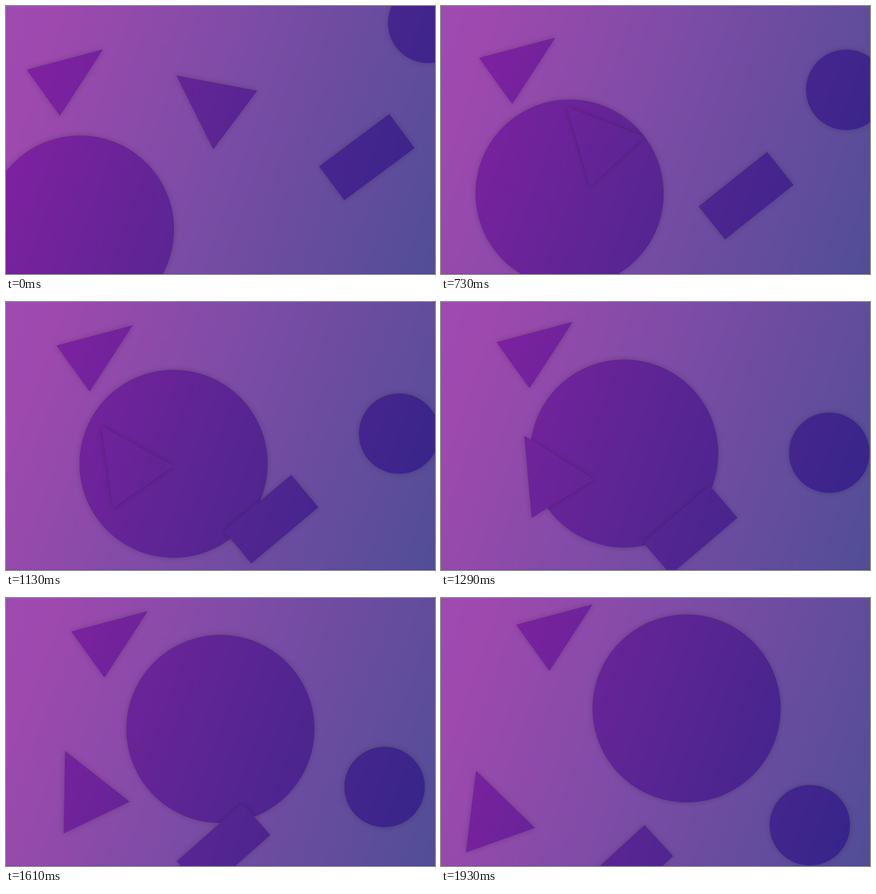
Recreate the animation shown at these times as an HTML page with a canvas. Size 947x592 px, loop 2180 ms.

```html
<!DOCTYPE html>
<html lang="en">
<head>
<meta charset="utf-8">
<title>Drifting shapes</title>
<style>
  html, body { margin: 0; width: 100%; height: 100%; overflow: hidden; background: #7b4ca5; }
  canvas { display: block; }
</style>
</head>
<body>
<canvas id="stage" width="947" height="592"></canvas>
<script>
const WIDTH = 947, HEIGHT = 592;
const LOOP = 2180, HOLD = 250, STEP = 80, LAST_STEP = 22;
const ctx = document.getElementById('stage').getContext('2d');

// Equivalent of a CSS linear-gradient at 110deg over the whole stage
function stageGradient(stops) {
  const angle = 20 * Math.PI / 180;
  const dx = Math.cos(angle), dy = Math.sin(angle);
  const half = (WIDTH * dx + HEIGHT * dy) / 2;
  const cx = WIDTH / 2, cy = HEIGHT / 2;
  const gradient = ctx.createLinearGradient(
    cx - half * dx, cy - half * dy, cx + half * dx, cy + half * dy);
  for (const [offset, color] of stops) gradient.addColorStop(offset, color);
  return gradient;
}

const backdrop = stageGradient([[0, '#9f4ab1'], [0.1, '#9e49ae'], [0.5, '#7b4ca5'], [1, '#514d96']]);
const ink = stageGradient([[0, '#8420a4'], [0.125, '#7d21a0'], [0.466, '#5d2593'], [0.88, '#3b258b'], [1, '#34258a']]);

function circle(radius) {
  const path = new Path2D();
  path.arc(0, 0, radius, 0, Math.PI * 2);
  return path;
}

function polygon(...points) {
  const path = new Path2D();
  for (const [x, y] of points) path.lineTo(x, y);
  path.closePath();
  return path;
}

function rectangle(w, h) {
  const path = new Path2D();
  path.rect(-w / 2, -h / 2, w, h);
  return path;
}

// start: position at rest; move: pixels per step; angle and spin in degrees
const shapes = [
  { path: circle(207.7), start: [163.3, 493.6], move: [17.22, -11.35] },
  { path: circle(88.8), start: [932, 37.3], move: [-5.354, 21.12] },
  { path: polygon([-84.3, -19.3], [84.3, -64.3], [-11, 82.5]),
    start: [130, 160], move: [5.47, -3.71] },
  { path: polygon([-76.3, -57.7], [102.2, -24.2], [5.2, 105.3]),
    start: [452.3, 211.2], move: [-15.61, 11.83], spin: 1.531 },
  { path: rectangle(193.2, 93.3),
    start: [796.5, 333.9], move: [-17.58, 12.15], angle: -36.65, spin: -0.27 }
];

function drawShape({ path, start, move, angle = 0, spin = 0 }, step) {
  const matrix = new DOMMatrix()
    .translate(start[0] + move[0] * step, start[1] + move[1] * step)
    .rotate(angle + spin * step);
  const placed = new Path2D();
  placed.addPath(path, matrix);
  ctx.fill(placed);
}

function draw(time) {
  const step = Math.min(LAST_STEP, Math.max(0, Math.floor((time - HOLD) / STEP) + 1));
  ctx.shadowColor = 'transparent';
  ctx.fillStyle = backdrop;
  ctx.fillRect(0, 0, WIDTH, HEIGHT);

  ctx.fillStyle = ink;
  ctx.shadowColor = 'rgba(0, 0, 0, 0.22)';
  ctx.shadowBlur = 13;
  for (const shape of shapes) drawShape(shape, step);

  ctx.shadowColor = 'transparent';
  ctx.fillStyle = 'rgba(0, 0, 0, 0.18)';
  ctx.fillRect(0, HEIGHT - 1, WIDTH, 1);
}

const startTime = performance.now();
function tick() {
  draw((performance.now() - startTime) % LOOP);
  requestAnimationFrame(tick);
}
tick();
</script>
</body>
</html>
```
